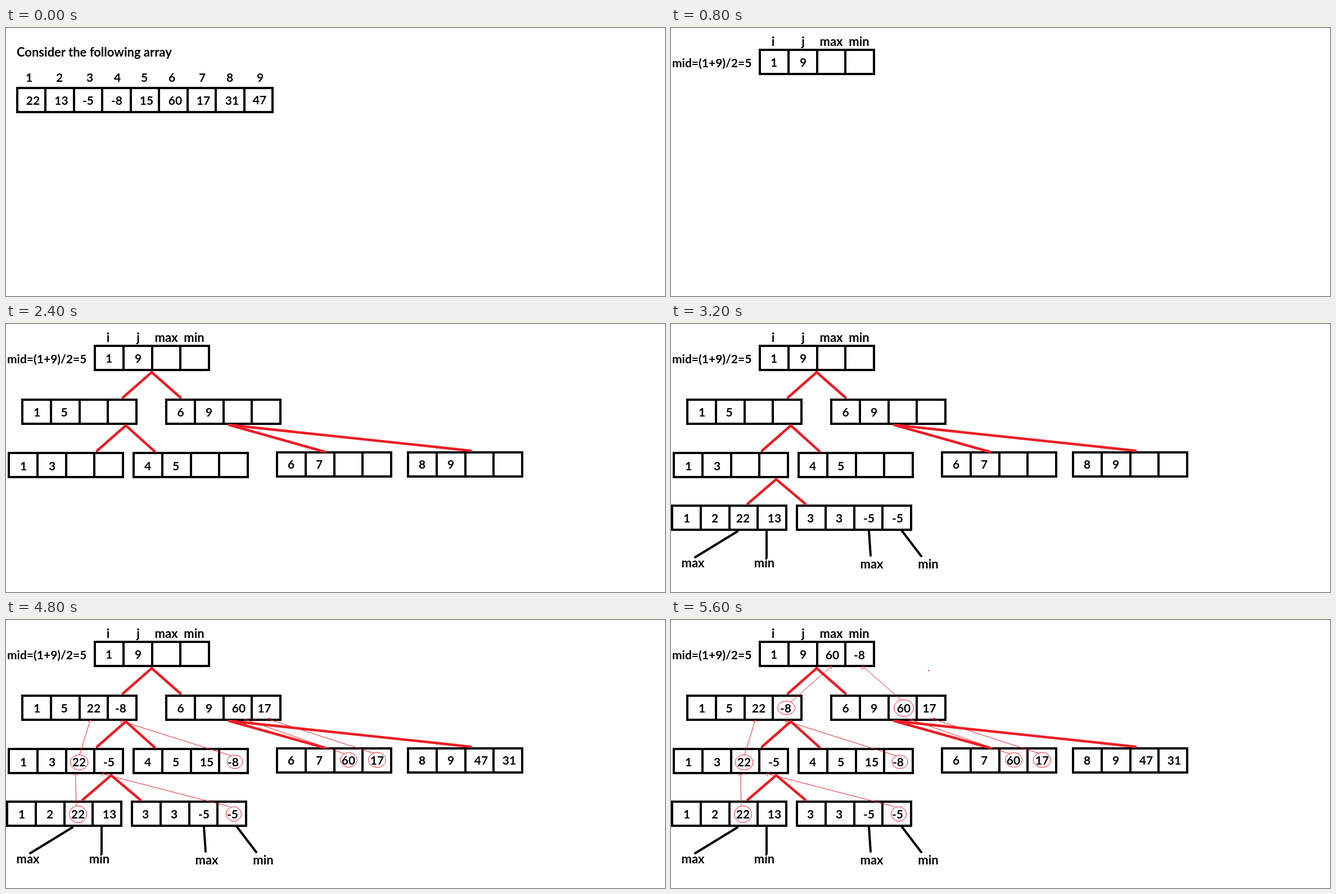
An HTML page for the animation above (6400 ms loop, 1172 px wide and 478 px high).

```html
<!DOCTYPE html>
<html lang="en">
<head>
<meta charset="utf-8">
<title>Max and min by divide and conquer</title>
<style>
  html, body { margin: 0; width: 100%; height: 100%; overflow: hidden; background: #fff; }
  svg { display: block; }
  text { font: bold 21px Lato, sans-serif; text-anchor: middle; }
  .word { font-size: 22px; }
  .left { text-anchor: start; }
  .box, .leg { fill: none; stroke: #000; stroke-width: 4; }
  .leg, .branch { stroke-linecap: round; }
  .branch { fill: none; stroke: #ed1c24; stroke-width: 4.5; stroke-linejoin: round; }
  .thin { fill: none; stroke: #ed1c24; stroke-width: 1; }
</style>
</head>
<body>
<svg id="stage" width="1172" height="478"></svg>
<script>
const STEP = 800, COUNT = 8;

const text = (s, x, y, cls = "") =>
  `<text class="${cls}" x="${x}" y="${y + 7.5}">${s}</text>`;

// pairs: label, centre x, label, centre x ...
const row = (y, pairs, cls) => {
  let out = "";
  for (let i = 0; i < pairs.length; i += 2) out += text(pairs[i], pairs[i + 1], y, cls);
  return out;
};

const path = (d, cls) => `<path class="${cls}" d="${d}"/>`;

const cells = (x, y, n = 4, w = 203) => {
  let d = `M${x} ${y}h${w}v43h${-w}z`;
  for (let i = 1; i < n; i++) d += `M${x + Math.round(w * i / n)} ${y}v43`;
  return path(d, "box");
};

// two branches leaving one point
const fork = (x, y, x1, y1, x2, y2) =>
  path(`M${x1} ${y1}L${x} ${y}L${x2} ${y2}`, "branch");

const ring = (x, y, rx, ry) =>
  `<ellipse class="thin" cx="${x}" cy="${y}" rx="${rx}" ry="${ry}"/>`;

// thin arrow; a and b are the offsets of the two barbs from the tip
const arrow = (x1, y1, x, y, a, b) =>
  path(`M${x1} ${y1}L${x} ${y}m${a}L${x} ${y}l${b}`, "thin");

const steps = [
  text("Consider the following array", 19, 43.5, "word left") +
  row(88.5, [1, 41, 2, 95, 3, 149, 4, 198, 5, 246, 6, 295, 7, 349, 8, 398, 9, 452]) +
  cells(20, 107, 9, 454) +
  row(129, [22, 48, 13, 98.5, -5, 146, -8, 197, 15, 250, 60, 301, 17, 351, 31, 402]) +
  text(47, 451, 128),

  row(24, ["i", 181.5, "j", 235, "max", 285, "min", 334.5], "word") +
  text("mid=(1+9)/2=5", 2, 62.5, "left") +
  cells(158, 39) + row(61, [1, 183, 9, 235]),

  cells(29, 135) + cells(285, 135) +
  row(157, [1, 55, 5, 103.5, 6, 310.5, 9, 361]) +
  fork(259, 86, 208, 131, 310, 131),

  cells(5, 230) + cells(227, 230) + cells(482, 229) + cells(715, 229) +
  row(253, [1, 31, 3, 82, 4, 252, 5, 302]) +
  row(250.5, [6, 507, 7, 557, 8, 740, 9, 791]) +
  fork(213, 181, 162, 226, 264, 227) +
  fork(397, 180, 567, 228, 826, 226),

  cells(2, 324) + cells(224, 324) +
  row(346, [1, 28, 2, 78, 22, 128, 13, 184, 3, 248, 3, 299, -5, 352, -5, 403]) +
  fork(187, 277, 136, 321, 239, 321) +
  path("M118 370L43 416M170 370V417M352 369L355 413M410 368L445 414", "leg") +
  row(426.5, ["max", 39, "min", 166], "word") +
  row(428.5, ["max", 357, "min", 457.5], "word"),

  row(253, [22, 130, -5, 183, 15, 357, -8, 404]) +
  row(250.5, [60, 609, 17, 660, 47, 845, 31, 895]) +
  ring(128, 346.5, 15.5, 15) + ring(405, 346, 13.5, 13) +
  arrow(125, 331, 123.5, 274, "-4 4", "4 3") +
  arrow(398, 333, 170, 274, "6 -3", "2 5"),

  row(157, [22, 156, -8, 204, 60, 414, 17, 459.5]) +
  ring(130, 254, 16, 13.5) + ring(407, 253, 14, 12) +
  ring(609.5, 249.5, 15, 13) + ring(660, 249.5, 15.5, 13.5) +
  arrow(131, 240, 150, 178, "-4 4", "4 3") +
  arrow(400, 242, 204, 180, "5 -3", "1 5") +
  arrow(603, 239, 424, 177, "6 -1", "3 5") +
  arrow(655, 238, 464, 176, "6 -1", "3 5"),

  row(62, [60, 287, -8, 335]) +
  ring(205, 156.5, 15.5, 12) + ring(414, 157, 17.5, 15) +
  arrow(213, 146, 286, 82, "-7 1", "-1 6") +
  arrow(410, 143, 340, 82, "0 7", "6 2") +
  `<rect x="457" y="89" width="2" height="2" fill="#ed1c24"/>`
];

const stage = document.getElementById("stage");
stage.innerHTML = steps.map(s => `<g>${s}</g>`).join("");
const groups = [...stage.children];
const start = performance.now();

function draw(now) {
  const step = Math.floor(Math.max(0, now - start) / STEP) % COUNT;
  groups.forEach((g, i) => {
    const on = i === 0 ? step === 0 : step >= i;
    g.style.display = on ? "" : "none";
  });
  requestAnimationFrame(draw);
}
draw(start);
</script>
</body>
</html>
```
